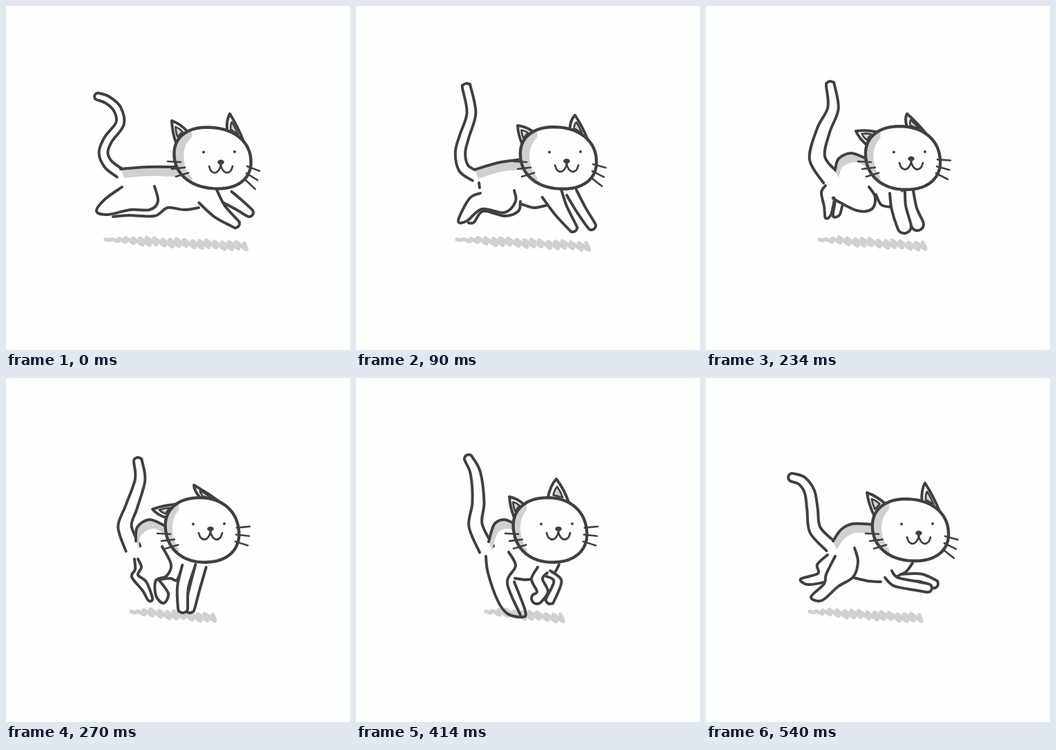
An HTML page with a canvas for the animation above (0.63 s loop, 498 by 498 pixels).

```html
<!DOCTYPE html>
<html>
<head>
<meta charset="utf-8">
<title>Running cat</title>
<style>
html, body { margin: 0; height: 100%; overflow: hidden; background: #fdfffc; }
canvas { display: block; }
</style>
</head>
<body>
<canvas id="stage" width="498" height="498"></canvas>
<script>
const ctx = document.getElementById('stage').getContext('2d');
const PAPER = '#fdfffc', INK = '#404040', GREY = '#d0d0d0';
const STEP = 90, HEAD_Y = 220;

// Key points of the run. Strokes are "x,y x,y ..." joined by "/".
// Tubes (tail and front legs) are [spine, half width at root, at end].
const poses = [
  {
    x: 299, ears: '240,166 324,156', shadow: [144, 349],
    tail: ['165,242 148,229 141,212 148,193 165,170 161,149 147,136 133,131', 7, 5],
    back: '166,236 205,233 247,233',
    hind: '168,262 143,280 131,297 147,302 180,295 208,295 220,283 215,261/155,305 178,303 215,304 234,292 258,295 279,292',
    legs: [['321,277 336,287 352,299', 10, 6], ['292,275 309,297 332,315', 16, 6]]
  },
  {
    x: 293, ears: '234,173 317,158', shadow: [146, 338],
    tail: ['173,246 156,235 151,212 157,188 167,155 160,118', 8, 6],
    back: '172,237 205,227 240,222',
    hind: '178,256 179,263/180,271 164,279 148,311 161,311 182,294 215,299 231,283 229,267/163,314 171,313 184,297 215,304 235,297 238,283/240,287 258,292 278,288',
    legs: [['312,270 326,295 341,318', 8, 6], ['283,270 296,295 314,321', 15, 6]]
  },
  {
    x: 285, ears: '217,181 291,156', shadow: [164, 319],
    tail: ['181,249 161,220 170,180 184,148 180,115', 13, 6],
    back: '187,237 192,221 210,213 232,221',
    hind: '173,260 167,270 171,290 173,307 181,302 186,280 186,280 218,296 240,294 245,277 236,262/187,283 184,304 193,303 197,290/246,273 254,288 269,291',
    legs: [['292,268 297,295 306,316', 8, 9], ['277,270 279,292 287,319', 11, 10]]
  },
  {
    x: 284, ears: '212,190 272,155', shadow: [181, 304],
    tail: ['184,247 172,215 181,188 194,148 191,121', 11, 6],
    back: '188,236 190,216 208,205 232,215',
    hind: '186,262 187,277 182,288 198,308 206,322 212,319 203,295 191,285 196,274 191,262/226,244 239,270 232,287 217,293 217,315 228,326 235,312 221,292/221,292 238,290 247,293 253,280',
    legs: [['282,272 273,305 266,333', 8, 7], ['264,273 256,303 256,333', 9, 7]]
  },
  {
    x: 281, ears: '222,172 290,146', shadow: [188, 301],
    tail: ['189,248 173,213 177,180 173,138 163,117', 11, 6],
    back: '192,237 200,212 214,205 228,210',
    hind: '188,258 191,282 205,322 219,341 241,346 245,337 229,295/221,252 231,272 219,297 238,343/230,290 245,292 257,291/294,270 287,282 276,284',
    legs: [['278,283 292,294 281,321', 5, 6], ['270,278 262,291 270,309 262,319', 8, 8]]
  },
  {
    x: 290, ears: '226,164 308,146', shadow: [184, 326],
    tail: ['188,246 168,207 157,168 145,143 137,134', 11, 6],
    back: '190,233 196,216 212,208 236,210',
    hind: '188,260 184,290 187,330 202,349 216,341 205,325 218,303 223,272 216,250/198,338 197,320 212,300/222,292 235,296 252,297/294,270 285,283 274,291',
    legs: [['278,297 300,300 313,311', 6, 7], ['261,281 263,299 290,310 306,320', 6, 8]]
  },
  {
    x: 296, ears: '233,166 317,152', shadow: [150, 313],
    tail: ['181,244 158,220 154,190 150,165 139,149 125,144', 9, 6],
    back: '184,236 196,219 213,211 241,212',
    hind: '176,256 161,270 162,283 137,291 147,299 170,296/187,258 174,284 171,298 152,317 168,322 191,302 213,288 220,266 215,246/213,289 235,294 253,295/299,268 290,280 277,287',
    legs: [['282,289 310,289 330,298', 5, 6], ['264,284 275,295 305,301 321,304', 7, 6]]
  }
];

const points = text => text.split(' ').map(p => p.split(',').map(Number));

// Smooth path through the points; a doubled point makes a corner.
function smooth(pts) {
  const path = new Path2D(), last = pts.length - 1;
  path.moveTo(...pts[0]);
  for (let i = 0; i < last; i++) {
    const a = pts[Math.max(0, i - 1)], b = pts[i], c = pts[i + 1], d = pts[Math.min(last, i + 2)];
    path.bezierCurveTo(b[0] + (c[0] - a[0]) / 6, b[1] + (c[1] - a[1]) / 6,
      c[0] - (d[0] - b[0]) / 6, c[1] - (d[1] - b[1]) / 6, c[0], c[1]);
  }
  return path;
}

function stroke(path, width = 4, color = INK) {
  ctx.lineWidth = width;
  ctx.strokeStyle = color;
  ctx.stroke(path);
}

function fill(path, color) {
  ctx.fillStyle = color;
  ctx.fill(path);
}

function dot(x, y, rx, ry = rx) {
  const path = new Path2D();
  path.ellipse(x, y, rx, ry, 0, 0, 7);
  fill(path, INK);
}

// Tapered outline around a spine, open at the root and round at the end.
function drawTube([spine, rootWidth, endWidth]) {
  const pts = points(spine), last = pts.length - 1, left = [], right = [];
  let dir;
  pts.forEach(([x, y], i) => {
    const a = pts[Math.max(0, i - 1)], b = pts[Math.min(last, i + 1)];
    dir = Math.atan2(b[1] - a[1], b[0] - a[0]);
    const w = rootWidth + (endWidth - rootWidth) * i / last;
    const dx = w * Math.sin(dir), dy = w * Math.cos(dir);
    left.push([x + dx, y - dy]);
    right.unshift([x - dx, y + dy]);
  });
  const [x, y] = pts[last];
  const cap = [-.8, 0, .8].map(a => [x + endWidth * Math.cos(dir + a), y + endWidth * Math.sin(dir + a)]);
  const path = smooth([...left, ...cap, ...right]);
  fill(path, PAPER);
  stroke(path);
}

function drawShadow([x0, x1]) {
  const n = 2 * Math.round((x1 - x0) / 11), pts = [];
  for (let i = 0; i <= n; i++) {
    const t = i / n, side = i % 2 ? 1 : -1;
    const reach = side * Math.min(1, t * 4) * (5 + Math.sin(i * 2.3));
    pts.push([x0 + (x1 - x0) * t + reach * .9, 338 + 10 * t + reach]);
  }
  stroke(smooth(pts), 5.5, GREY);
}

function drawBack(text) {
  const top = points(text);
  const under = top.map(([x, y]) => [x + 5, y + 13]).reverse();
  fill(smooth([...top, ...under]), GREY);
  stroke(smooth(top));
}

// Rounded box, wider and flatter when the body is stretched (swing 1).
function headPoint(x, swing, angle) {
  const power = v => Math.sign(v) * Math.abs(v) ** .91;
  const c = power(Math.cos(angle)), s = power(Math.sin(angle)), tilt = .05 * swing;
  const u = (54 + 1.5 * swing) * c + 5 * s, v = (45.5 - 1.5 * swing) * s;
  return [x + u - v * tilt, HEAD_Y + v + u * tilt];
}

function drawEar(base, tip, end) {
  const mid = [0, 1].map(k => (base[k] + tip[k] + end[k]) / 3);
  const ear = size => {
    const [a, b, c] = [base, tip, end].map(p => p.map((v, k) => mid[k] + (v - mid[k]) * size));
    const bulge = (p, q) => p.map((v, k) => (v + q[k]) * .7 - mid[k] * .4);
    const path = new Path2D();
    path.moveTo(...a);
    path.quadraticCurveTo(...bulge(a, b), ...b);
    path.quadraticCurveTo(...bulge(b, c), ...c);
    return path;
  };
  fill(ear(1), PAPER);
  stroke(ear(1));
  const inner = ear(.45);
  inner.closePath();
  fill(inner, GREY);
  stroke(inner, 2.6);
}

function drawFace(x, swing) {
  const nx = x + 12, ny = 222 + 4 * swing, droop = 4 + 8 * swing;
  dot(nx - 25, 211.5, 2);
  dot(nx + 20, 211, 2);
  dot(nx, ny, 4.8, 3.5);
  for (const side of [-1, 1]) {
    const cup = [[0, 0], [1, 8], [7, 15], [14, 13], [17, 6]];
    stroke(smooth(cup.map(([u, v]) => [nx + side * u, ny + v])), 2.8);
  }
  for (let k = 0; k < 3; k++) {
    const whisker = (wx, wy, angle) => stroke(smooth([[wx, wy],
      [wx + 19 * Math.cos(angle), wy + 19 * Math.sin(angle)]]), 2.6);
    whisker(x - 65 + 6 * k, HEAD_Y + 5 + 11 * k, .05 - .17 * k);
    whisker(x + 50 - k, HEAD_Y + droop + 10 * k, .03 * droop + .2 * k);
  }
}

function drawHead(pose, swing) {
  const at = angle => headPoint(pose.x, swing, angle);
  const head = new Path2D();
  for (let a = 0; a < 6.28; a += .1) head.lineTo(...at(a));
  head.closePath();
  fill(head, GREY);
  ctx.save();
  ctx.clip(head);
  ctx.translate(12 + 2 * swing, 3);
  fill(head, PAPER);
  ctx.fillRect(pose.x - 44, 150, 120, 130);
  ctx.restore();
  const [leftTip, rightTip] = points(pose.ears), turn = 1.35 - .18 * swing;
  drawEar(at(Math.PI + .4), leftTip, at(Math.PI + .95));
  drawEar(at(-turn), rightTip, at(.58 - turn));
  stroke(head, 4.4);
  drawFace(pose.x, swing);
}

function draw(index) {
  const pose = poses[index], swing = Math.cos(2 * Math.PI * index / poses.length);
  ctx.fillStyle = PAPER;
  ctx.fillRect(0, 0, 498, 498);
  ctx.lineCap = ctx.lineJoin = 'round';
  drawShadow(pose.shadow);
  drawTube(pose.tail);
  drawBack(pose.back);
  pose.hind.split('/').forEach(s => stroke(smooth(points(s))));
  pose.legs.forEach(drawTube);
  drawHead(pose, swing);
}

const start = performance.now();
function tick() {
  draw(Math.floor((performance.now() - start) / STEP) % poses.length);
  requestAnimationFrame(tick);
}
tick();
</script>
</body>
</html>
```
